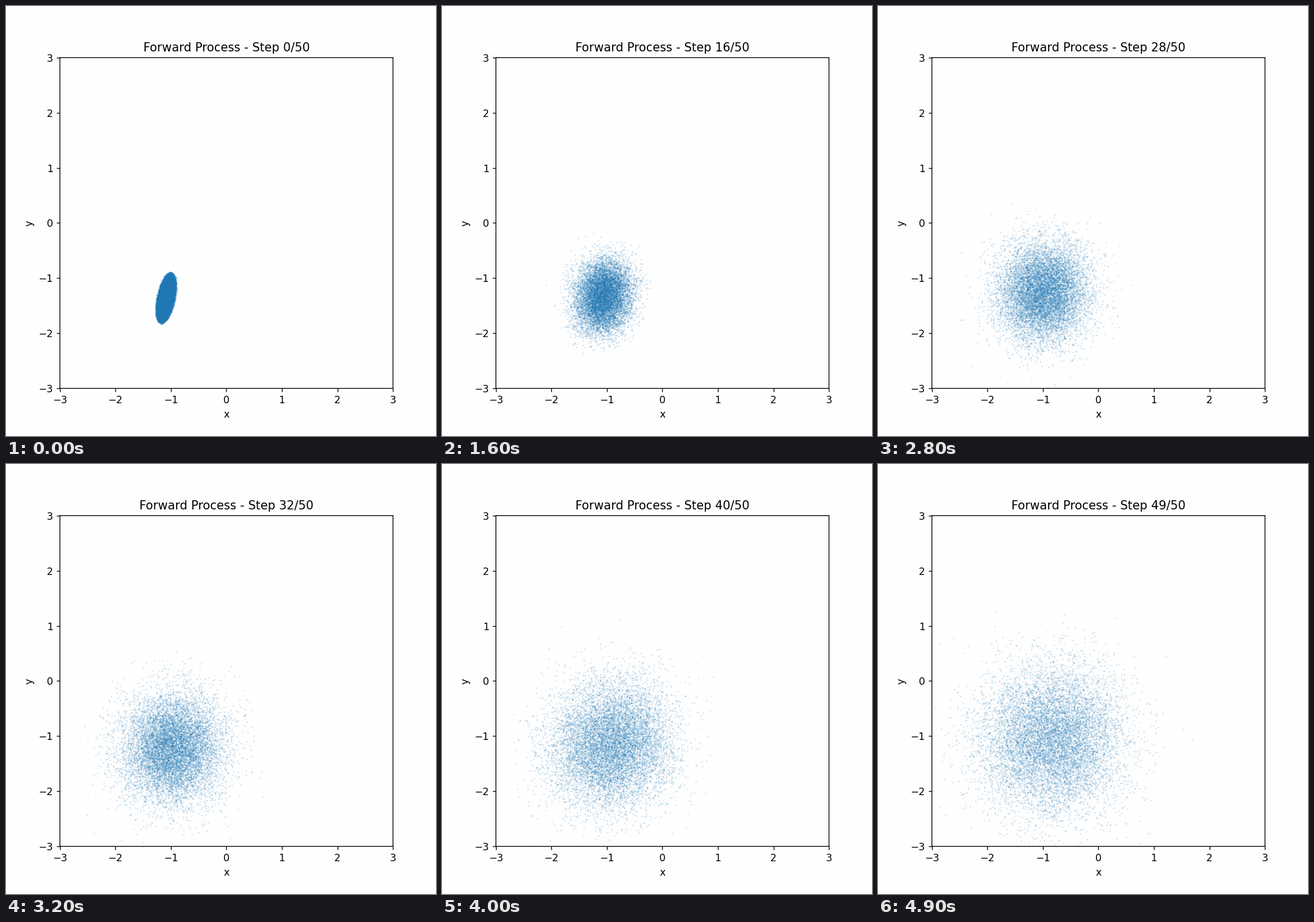
Recreate the animation shown at these times as a matplotlib script. Size 748x748 px, loop 5 s.

```python
import numpy as np
import matplotlib.pyplot as plt
from matplotlib.animation import FuncAnimation

STEPS = 50
POINTS = 10000
CENTER = np.array([-1.09, -1.357])
HALF_WIDTH, HALF_HEIGHT, TILT = 0.182, 0.46, 0.46
PAPER = "#fefefe"

# Linear noise schedule
betas = np.linspace(1e-4, 0.02, STEPS)
alpha_bar = np.cumprod(1 - betas)


def tilted_ellipse(rng):
    """Points spread evenly over a slanted ellipse."""
    radius = np.sqrt(rng.random(POINTS))
    angle = rng.uniform(0, 2 * np.pi, POINTS)
    u, v = radius * np.cos(angle), radius * np.sin(angle)
    x = HALF_WIDTH * (TILT * v + np.sqrt(1 - TILT**2) * u)
    return CENTER + np.column_stack([x, HALF_HEIGHT * v])


start = tilted_ellipse(np.random.default_rng(7))


def diffuse(step):
    noise = np.random.default_rng(100 + step).standard_normal(start.shape)
    signal = alpha_bar[step]
    return np.sqrt(signal) * start + np.sqrt(1 - signal) * noise


plt.rcParams["font.family"] = "DejaVu Sans"
fig, ax = plt.subplots(figsize=(6, 6), dpi=748 / 6, facecolor=PAPER)
fig.subplots_adjust(left=94 / 750, right=0.9, bottom=83 / 750, top=0.88)
ax.set(xlim=(-3, 3), ylim=(-3, 3), xlabel="x", ylabel="y", facecolor=PAPER)
for spine in ax.spines.values():
    spine.set_snap(False)
cloud = ax.scatter(*start.T, s=1, marker=".", alpha=0.2, color="tab:blue")
title = ax.set_title("")


def update(step):
    cloud.set_offsets(diffuse(step))
    title.set_text(f"Forward Process - Step {step}/{STEPS}")
    return cloud, title


anim = FuncAnimation(fig, update, frames=STEPS, interval=100,
                     repeat=True, repeat_delay=0)
plt.show()
```
